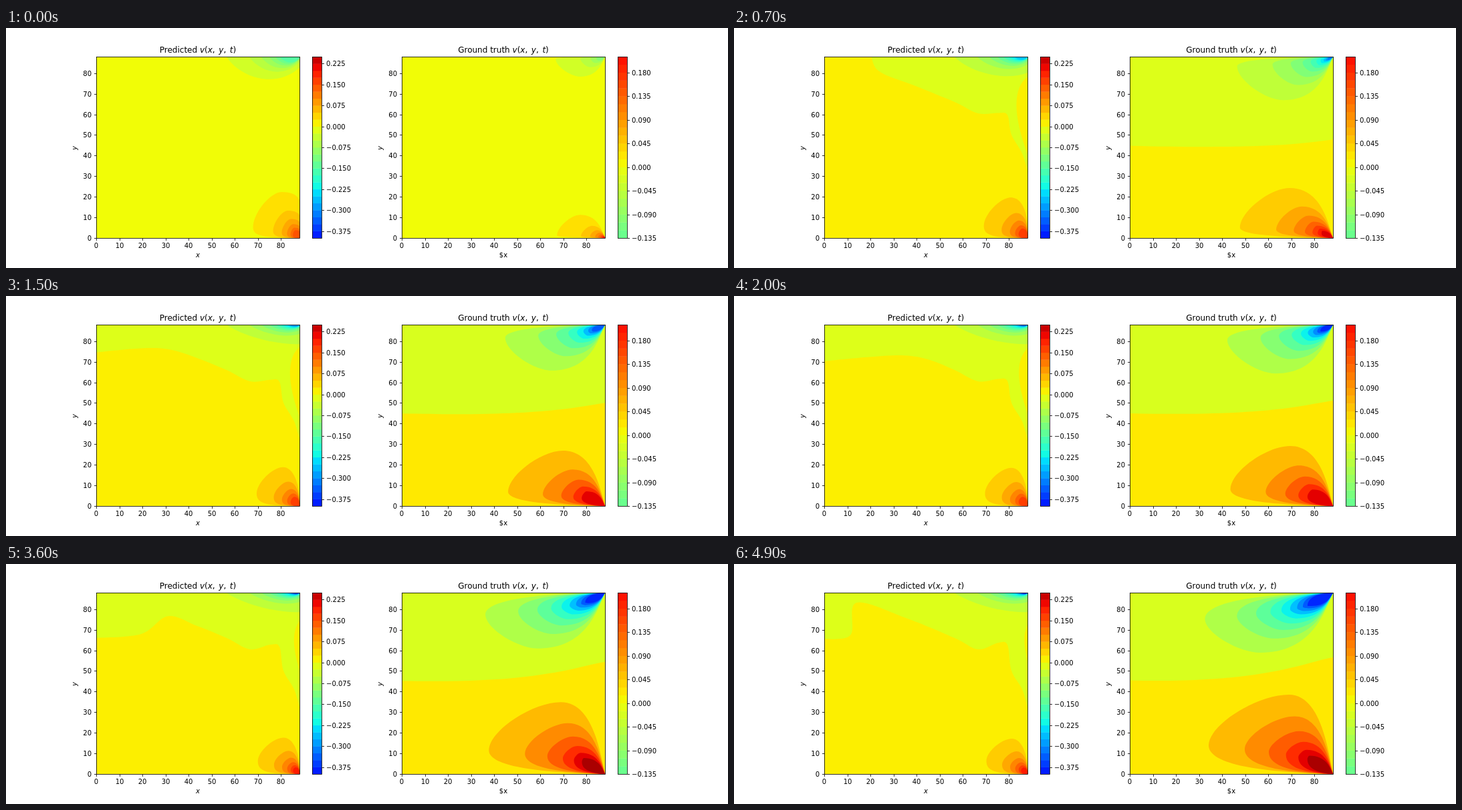
These frames come from a looping animation (1080x360 px, 5 s). An HTML page:

```html
<!DOCTYPE html>
<html>
<head>
<meta charset="utf-8">
<style>
html, body { margin: 0; width: 100%; height: 100%; overflow: hidden; background: #fff; }
svg { display: block; font: 10px "DejaVu Sans", sans-serif; }
.line { fill: none; stroke: #000; stroke-width: .8; }
.title { font-size: 12px; }
.it { font-style: italic; }
</style>
</head>
<body>
<svg id="stage" width="1080" height="360" viewBox="0 0 1080 360">
  <clipPath id="clipL"><rect x="135" y="43" width="304.5" height="272"/></clipPath>
  <clipPath id="clipR"><rect x="592" y="43" width="304.5" height="272"/></clipPath>
  <g id="left" clip-path="url(#clipL)"></g>
  <g id="right" clip-path="url(#clipR)"></g>
  <g id="axes"></g>
</svg>
<script>
const TOP = 43, BOTTOM = 315, HEIGHT = BOTTOM - TOP;
const LOOP = 5000, STEP = 100, ZERO = .638;
const $ = id => document.getElementById(id);
const clamp = v => Math.max(0, Math.min(1, v));
const mix = (a, b, f) => a + (b - a) * f;

// Jet colour map, p in 0..1
function jet(p) {
  const r = p < .89 ? (p - .35) / .31 : 1 - (p - .89) / .22;
  const g = p < .5 ? (p - .125) / .25 : 1 - (p - .64) / .27;
  const b = p < .2 ? .5 + p / .22 : 1 - (p - .34) / .31;
  return `rgb(${[r, g, b].map(v => Math.round(255 * clamp(v)))})`;
}

const path = (d, fill) => `<path d="${d}" fill="${fill}"/>`;
const rect = (x, y, w, h, fill) => `<rect x="${x}" y="${y}" width="${w}" height="${h}" fill="${fill}"/>`;

// The diffusing field spreads with the cube root of time
const growth = t => Math.cbrt(t / (LOOP - STEP));
// At first one colour band straddles zero, then zero divides two bands
const bandAt = (t, sign, k, step) => ZERO + sign * (k + (t ? .5 : .15)) * step;

// Nested contours from the background up to the colour limit
function nest(t, sign, step, limit, draw) {
  let out = "";
  for (let k = 0; ; k++) {
    const p = bandAt(t, sign, k + 1, step);
    if ((p - limit) * sign > 0) return out;
    out += path(draw(k), jet(p));
  }
}

// Smooth curve through points
function spline(pts) {
  let d = `M${pts[0]}`;
  for (let i = 0; i < pts.length - 1; i++) {
    const a = pts[i], b = pts[i + 1], p = pts[i - 1] || a, n = pts[i + 2] || b;
    const c1 = a.map((v, j) => v + (b[j] - p[j]) / 6);
    const c2 = b.map((v, j) => v - (n[j] - a[j]) / 6);
    d += `C${c1} ${c2} ${b}`;
  }
  return d;
}

const slim = { yPower: .42, sideY: .35, baseX: .6, baseY: .05, topX: .3, endX: .12, endY: .35 };
const round = { yPower: .7, sideY: .2, baseX: .8, baseY: 0, topX: .4, endX: 0, endY: .6 };

// Teardrop pinned to a corner: side extreme (lx, ly), far extreme (tx, ty)
function lobe(x0, y0, dir, o, k) {
  const s = o.ratio ** (k ** o.power), bulge = o.bulge || 0;
  const lx = o.lx * s, ly = o.ly * s ** o.yPower;
  const tx = o.tx * s ** o.lean, ty = o.ty * s ** .93;
  const P = (x, y) => `${(x0 - x).toFixed(2)},${(y0 + dir * y).toFixed(2)} `;
  return `M${P(0, 0)}C${P(lx * o.baseX, ly * o.baseY)}${P(lx, ly * o.sideY)}${P(lx, ly)}` +
    `C${P(lx, mix(ly, ty, .4))}${P(mix(tx, lx, .4), ty)}${P(tx, ty)}` +
    `C${P(tx * (o.topX - bulge), ty)}${P(tx * (o.endX - bulge), ty * (o.endY + bulge / 2))}${P(0, 0)}Z`;
}

// Flat pocket hanging from the top right corner
function pocket(x0, y0, flat, k) {
  const s = .69 ** (k ** .78), a = 110 * s;
  const c1 = mix(35, 17, flat) * s, c2 = mix(47, 31, flat) * s, end = mix(16, 29, flat) * s * s;
  return `M${x0 - a},${y0}C${x0 - a * .78},${y0 + c1} ${x0 - a * .3},${y0 + c2} ${x0},${y0 + end}V${y0}Z`;
}

// Zero line of the prediction: a base sinks at the left while a fold drifts along a fixed ridge
function foldedLine(t) {
  const base = 113 * (1 - Math.exp((400 - t) / 800));
  const v = (t - 2500) / 1000, bend = 129 - 2.2 * t / 1000;
  const ridge = x => Math.max(58, 59 + (x - 205) * .42);
  const foldX = 258 - 13 * v * v, midX = (foldX + 330) / 2;
  return spline([
    [135, base], [foldX - 60 * Math.exp(-v * v / 3), base - 6],
    [foldX, ridge(foldX) + 12 * Math.exp(-v * v)], [midX, ridge(midX)], [330, 111],
    [365, 128], [395, bend], [409, bend + 3], [415, 160], [431, 188], [440, 218]]);
}

function drawLeft(t) {
  const g = growth(t), sec = t / 1000, split = t >= 500;
  const step = split ? .0375 : .03, bg = jet(bandAt(t, 1, 0, step));
  let out = rect(135, TOP, 305, HEIGHT, bg);
  if (split) {
    out += path(foldedLine(t) + "V0H135Z", jet(bandAt(t, -1, 0, step)));
    // Thin positive strip along the right wall
    const reach = (19.5 - 2.85 * sec) / .75, y1 = 70 + 4 * sec, y2 = 198 - 10 * sec;
    out += path(`M440,${y1}C${440 - reach},${y1 + 15} ${440 - reach},${(y1 + y2) / 2} 440,${y2}Z`, bg);
  }
  const low = {
    ...round, lx: 70 - 8 * g, ly: 16 + 4 * g, tx: 27 - 3 * g, ty: 69 - 16 * g,
    ratio: .57 + .05 * g, power: .76 + .07 * g, lean: .73, bulge: Math.max(0, .4 - .65 * g)
  };
  const flat = clamp((t - 400) / 500);
  return out + nest(t, 1, step, .85 + .04 * g, k => lobe(439.5, BOTTOM, -1, low, k)) +
    nest(t, -1, step, .45 - .3 * g, k => pocket(439.5, TOP, flat, k));
}

function drawRight(t) {
  const g = growth(t), step = t < 100 ? .03 : t < 1500 ? .0375 : .05;
  let out = rect(592, TOP, 305, HEIGHT, jet(bandAt(t, 1, 0, step)));
  if (t) {
    const y = 177 - t / 2000, end = 177 - 37 * g * g;
    out += path(`M592,${y}C800,${y + 5} 855,${end + 6} 897,${end}V43H592Z`, jet(bandAt(t, -1, 0, step)));
  }
  // Finer colour steps push every contour outwards
  const wide = (step / .05) ** -.35, lx = wide * (60 + 126 * g), ly = wide * (3 + 40 * g * g);
  const low = {
    ...slim, lx, ly, tx: wide * (31 + 72 * g - 37 * g * g), ty: wide * (29 + 90 * g ** 1.3),
    ratio: .5 + .21 * g, power: .75 + .2 * g * g, lean: .95 - .55 * g
  };
  const high = {
    ...slim, lx: lx * 1.03, ly: ly * .92, tx: wide * (31 + 78 * g ** 1.2), ty: wide * (25 + 65 * g),
    ratio: .5 + .25 * g, power: .83, lean: .75
  };
  return out + nest(t, 1, step, .93 + .04 * g, k => lobe(896, BOTTOM, -1, low, k)) +
    nest(t, -1, step, Math.max(.15, .5 - .5 * g), k => lobe(896, TOP, 1, high, k));
}

const text = (x, y, s, more = "") => `<text x="${Math.round(x)}" y="${Math.round(y)}" ${more}>${s}</text>`;
const line = d => `<path class="line" d="${d}"/>`;
const frame = (x, w) => `<rect class="line" x="${x + .5}" y="43.5" width="${w}" height="272"/>`;
const it = (s, gap = 0) => `<tspan class="it" dx="${gap}">${s}</tspan>`;
const middle = 'text-anchor="middle"';

function chart(x0, name, xLabel) {
  let out = frame(x0, 304);
  for (let i = 0; i < 9; i++) {
    const x = x0 + i * 304 / 8.8, y = BOTTOM - i * HEIGHT / 8.8;
    out += line(`M${Math.round(x) + .5},315.5v3.5M${x0 + .5},${Math.round(y) + .5}h-3.5`);
    out += text(x, 330, i * 10, middle) + text(x0 - 7, y + 4, i * 10, 'text-anchor="end"');
  }
  const formula = `${it("v")}(${it("x")},${it("y", 5.6)},${it("t", 5.6)})`;
  out += text(x0 + 152, 37, `${name} ${formula}`, `class="title" ${middle}`);
  out += text(x0 + 152, 344, xLabel, middle);
  return out + text(0, 0, it("y"), `${middle} transform="translate(${x0 - 29},180) rotate(-90)"`);
}

function colourBar(x, min, max, step, firstTick, tickStep) {
  const n = Math.round((max - min) / step), h = HEIGHT / n;
  let out = "";
  for (let i = 0; i < n; i++)
    out += rect(x, BOTTOM - (i + 1) * h, 14, h + (i ? .4 : 0), jet(ZERO + 1.25 * (min + (i + .5) * step)));
  out += frame(x, 14);
  for (let v = firstTick; v < max; v += tickStep) {
    const y = BOTTOM - (v - min) / (max - min) * HEIGHT;
    const label = (v < -1e-6 ? "\u2212" : "") + Math.abs(v).toFixed(3);
    out += line(`M${x + 14.5},${Math.round(y) + .5}h3.5`) + text(x + 21, y + 4, label);
  }
  return out;
}

$("axes").innerHTML =
  chart(135, "Predicted", it("x")) + colourBar(458, -.4, .25, .025, -.375, .075) +
  chart(592, "Ground truth", "$x") + colourBar(915, -.135, .21, .015, -.135, .045);

let shown = -1;
function tick(now) {
  const t = Math.floor(now % LOOP / STEP) * STEP;
  if (t !== shown) {
    shown = t;
    $("left").innerHTML = drawLeft(t);
    $("right").innerHTML = drawRight(t);
  }
  requestAnimationFrame(tick);
}
tick(performance.now());
</script>
</body>
</html>
```
